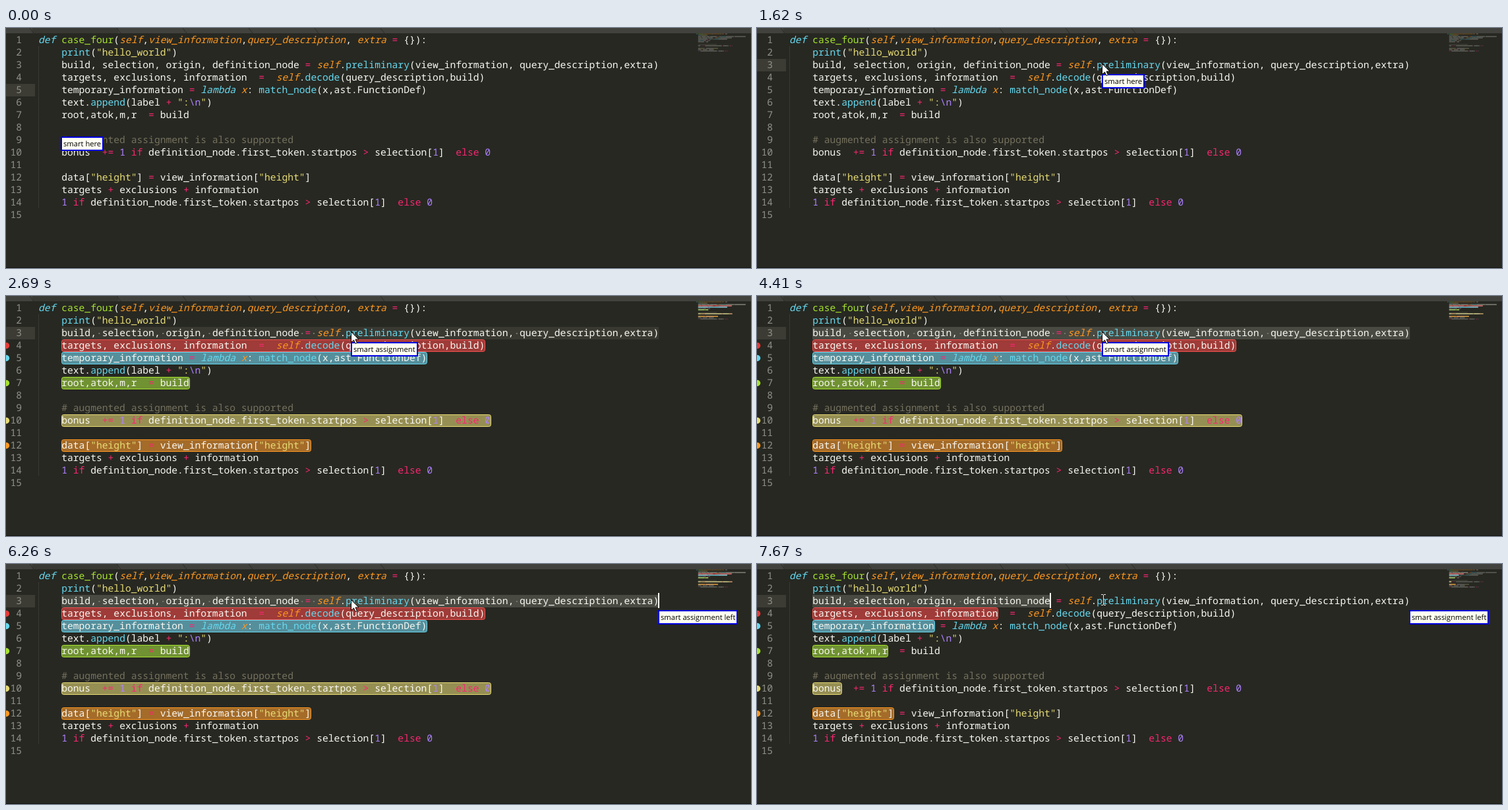
An HTML page with a canvas that plays this animation: 1130x365 px, repeating every 8000 ms.

```html
<!DOCTYPE html>
<html lang="en">
<head>
<meta charset="utf-8">
<title>Editor selection</title>
<style>
  html, body { margin: 0; width: 100%; height: 100%; overflow: hidden; background: #272822; }
  canvas { display: block; }
</style>
</head>
<body>
<canvas id="stage" width="1130" height="365"></canvas>
<script>
const ctx = document.getElementById('stage').getContext('2d');
const LOOP = 8000, CHAR = 8.796, LEFT = 49, ROW = 19;
const WHITE = '#f8f8f2', PINK = '#f92672', BLUE = '#66d9ef', GREEN = '#a6e22e',
      ORANGE = '#fd971f', YELLOW = '#e6db74', PURPLE = '#ae81ff', GREY = '#75715e';

const code = String.raw`def case_four(self,view_information,query_description, extra = {}):
    print("hello_world")
    build, selection, origin, definition_node = self.preliminary(view_information, query_description,extra)
    targets, exclusions, information  =  self.decode(query_description,build)
    temporary_information = lambda x: match_node(x,ast.FunctionDef)
    text.append(label + ":\n")
    root,atok,m,r  = build

    # augmented assignment is also supported
    bonus  += 1 if definition_node.first_token.startpos > selection[1]  else 0

    data["height"] = view_information["height"]
    targets + exclusions + information
    1 if definition_node.first_token.startpos > selection[1]  else 0
`.split('\n');

// row, full length, left-side length, border, fill
const marks = [
  [4, 73, 32, '#f0504d', '#9f3b38'],
  [5, 63, 21, BLUE, '#558f9c'],
  [7, 22, 13, GREEN, '#709232'],
  [10, 74, 5, YELLOW, '#968f53'],
  [12, 43, 14, ORANGE, '#a46b29']
];

// start, end, caret opacity reached
const fades = [
  [760, 760, 1], [1300, 1470, 0], [2000, 2000, 1], [2380, 2530, 0],
  [2840, 2840, 1], [3160, 3480, 0], [3850, 4020, 1], [4330, 4410, 0],
  [4950, 5020, 1], [5410, 5640, 0], [5870, 6050, 1],
  [6420, 6420, 0], [6570, 6570, 1], [6970, 7120, 0], [7580, 7670, 1]
];

// start, x, y, label; an empty label shows the small square
const popups = [
  [0, 83, 165, 'smart here'], [1620, 523, 70, 'smart here'], [1680, 523, 70, ''],
  [2230, 523, 70, 'smart'], [2380, 523, 70, 'smart assignment'],
  [5180, 989, 70, 'smart assignment'], [5330, 989, 70, ''],
  [5870, 989, 70, 'smart'], [6050, 989, 70, 'smart assignment'],
  [6180, 989, 70, 'smart assignment left']
];

// start, shape, x, y
const pointers = [
  [0, null], [70, beam, 731, 210], [140, beam, 630, 126], [210, beam, 546, 57],
  [440, beam, 532, 55], [530, beam, 525, 54], [760, ring, 523, 53],
  [910, arrow, 523, 54], [6420, beam, 525, 54]
];

const rowTop = n => 9 + ROW * (n - 1);
const colX = c => LEFT + c * CHAR;
const latest = (list, t) => list.filter(k => k[0] <= t).pop();

function rect(x, y, w, h, color) {
  ctx.fillStyle = color;
  ctx.fillRect(x, y, w, h);
}

function tokenize(line, index) {
  const tokens = [];
  let quoted = false;
  for (const m of line.matchAll(/#.*|\\n|"|\w+|[=+>]+|\s+|./g)) {
    const word = m[0], next = line[m.index + word.length];
    let color = WHITE, italic = false;
    if (word === '"') { quoted = !quoted; color = YELLOW; }
    else if (word === '\\n') color = PURPLE;
    else if (quoted) color = YELLOW;
    else if (word[0] === '#') color = GREY;
    else if (/^(def|lambda)$/.test(word)) { color = BLUE; italic = true; }
    else if (/^(if|else|[=+>]+)$/.test(word)) color = PINK;
    else if (/^\d/.test(word)) color = PURPLE;
    else if (/^\w/.test(word)) {
      if (next === '(') color = index ? BLUE : GREEN;
      else if (!index || word === 'self' || next === ':') { color = ORANGE; italic = true; }
    }
    if (word.trim()) tokens.push({ word, col: m.index, color, italic });
  }
  return tokens;
}
const rows = code.map(tokenize);

function tabs() {
  rect(0, 0, 1130, 8, '#41423d');
  rect(40, 0, 130, 8, '#383933');
  ctx.strokeStyle = '#2c2d28';
  ctx.lineWidth = 1;
  ctx.beginPath();
  for (const x of [36, 168, 268, 368, 468, 568]) {
    ctx.moveTo(x, 0);
    ctx.lineTo(x + 6, 8);
  }
  ctx.stroke();
  rect(0, 364, 1130, 1, '#151612');
}

function text() {
  ctx.textBaseline = 'alphabetic';
  rows.forEach((tokens, i) => {
    const y = rowTop(i + 1) + 14;
    ctx.font = '14.66px "Noto Sans Mono", monospace';
    ctx.textAlign = 'right';
    ctx.fillStyle = '#8f908a';
    ctx.fillText(i + 1, 24, y);
    ctx.textAlign = 'left';
    for (const k of tokens) {
      ctx.font = (k.italic ? 'italic ' : '') + '14.66px "Noto Sans Mono", monospace';
      ctx.fillStyle = k.color;
      ctx.fillText(k.word, colX(k.col), y);
    }
  });
}

function minimap(t) {
  const x = c => 1047 + c * 0.7, y = n => 8 + 2 * (n - 1);
  if (t >= 2690) {
    const left = t >= 6420;
    rect(x(4), y(3), (left ? 41 : 103) * 0.7, 2, '#49483e');
    for (const [n, full, part, , fill] of marks) rect(x(4), y(n), (left ? part : full) * 0.7, 2, fill);
  }
  ctx.globalAlpha = 0.4;
  rows.forEach((tokens, i) => {
    for (const k of tokens) rect(x(k.col), y(i + 1) + 0.5, k.word.length * 0.7, 1, k.color);
  });
  ctx.globalAlpha = 1;
}

function highlights(t) {
  const left = t >= 6420, end = left ? 41 : 103;
  const dim = t < 2840 || (left && t < 6570);
  const top = rowTop(3);
  rect(84, top, colX(4 + end) - 84, ROW, dim ? '#393932' : '#494a42');
  for (let c = 4; c < 4 + end; c++)
    if (code[2][c] === ' ') rect(colX(c) + 3.5, top + 9, 2, 2, '#77786d');
  for (const [n, full, part, border, fill] of marks) {
    const y = rowTop(n);
    ctx.beginPath();
    ctx.roundRect(84.5, y + 0.5, Math.round((left ? part : full) * CHAR), ROW - 1, 3);
    ctx.fillStyle = fill;
    ctx.fill();
    ctx.strokeStyle = border;
    ctx.lineWidth = 1;
    ctx.stroke();
    ctx.beginPath();
    ctx.arc(0.5, y + 9.5, 4.7, 0, 7);
    ctx.fillStyle = n === 4 ? '#e83a37' : border;
    ctx.fill();
  }
}

function caret(t) {
  let alpha = 0;
  for (const [start, end, to] of fades)
    if (t >= start) alpha += (to - alpha) * (end > start ? Math.min(1, (t - start) / (end - start)) : 1);
  ctx.globalAlpha = alpha;
  rect(t < 2690 ? 523 : t < 6420 ? 989 : 444, 44, 2, 23, WHITE);
  ctx.globalAlpha = 1;
}

function popup([, x, y, label]) {
  if (!label) return rect(x, y, 16, 16, '#fff');
  ctx.font = '11.2px "Open Sans", sans-serif';
  const w = Math.round(ctx.measureText(label).width) + 8;
  rect(x, y, w, 22, '#0000e0');
  rect(x + 2, y + 2, w - 4, 18, '#fffff2');
  ctx.fillStyle = '#000';
  ctx.fillText(label, x + 4, y + 15);
}

function beam(x, y) {
  rect(x, y - 7, 1, 15, '#e8e8e2');
  for (const end of [y - 8, y + 8]) {
    rect(x - 3, end, 3, 1, '#e8e8e2');
    rect(x + 1, end, 3, 1, '#e8e8e2');
  }
}

function ring(x, y) {
  ctx.beginPath();
  ctx.arc(x, y, 9.5, 0, 7);
  ctx.strokeStyle = '#4aa8d8';
  ctx.lineWidth = 4;
  ctx.stroke();
}

function arrow(x, y) {
  ctx.save();
  ctx.translate(x + 0.5, y + 0.5);
  ctx.fillStyle = '#fff';
  ctx.strokeStyle = '#000';
  ctx.lineWidth = 1;
  const shape = new Path2D('M0 0V16L4 12.5L6.5 18L9 17L6.5 11.5H11.5Z');
  ctx.fill(shape);
  ctx.stroke(shape);
  ctx.restore();
}

function draw(t) {
  rect(0, 0, 1130, 365, '#272822');
  tabs();
  rect(0, rowTop(t < 760 ? 5 : 3), 44, ROW, '#3c3c34');
  for (let y = 28; y < 274; y += 2) rect(49, y, 1, 1, '#4a4b44');
  if (t >= 2690) highlights(t);
  text();
  minimap(t);
  caret(t);
  popup(latest(popups, t));
  const [, shape, x, y] = latest(pointers, t);
  if (shape) shape(x, y);
}

ctx.textRendering = 'geometricPrecision';
const began = performance.now();
function frame() {
  draw((performance.now() - began) % LOOP);
  requestAnimationFrame(frame);
}
frame();
</script>
</body>
</html>
```
